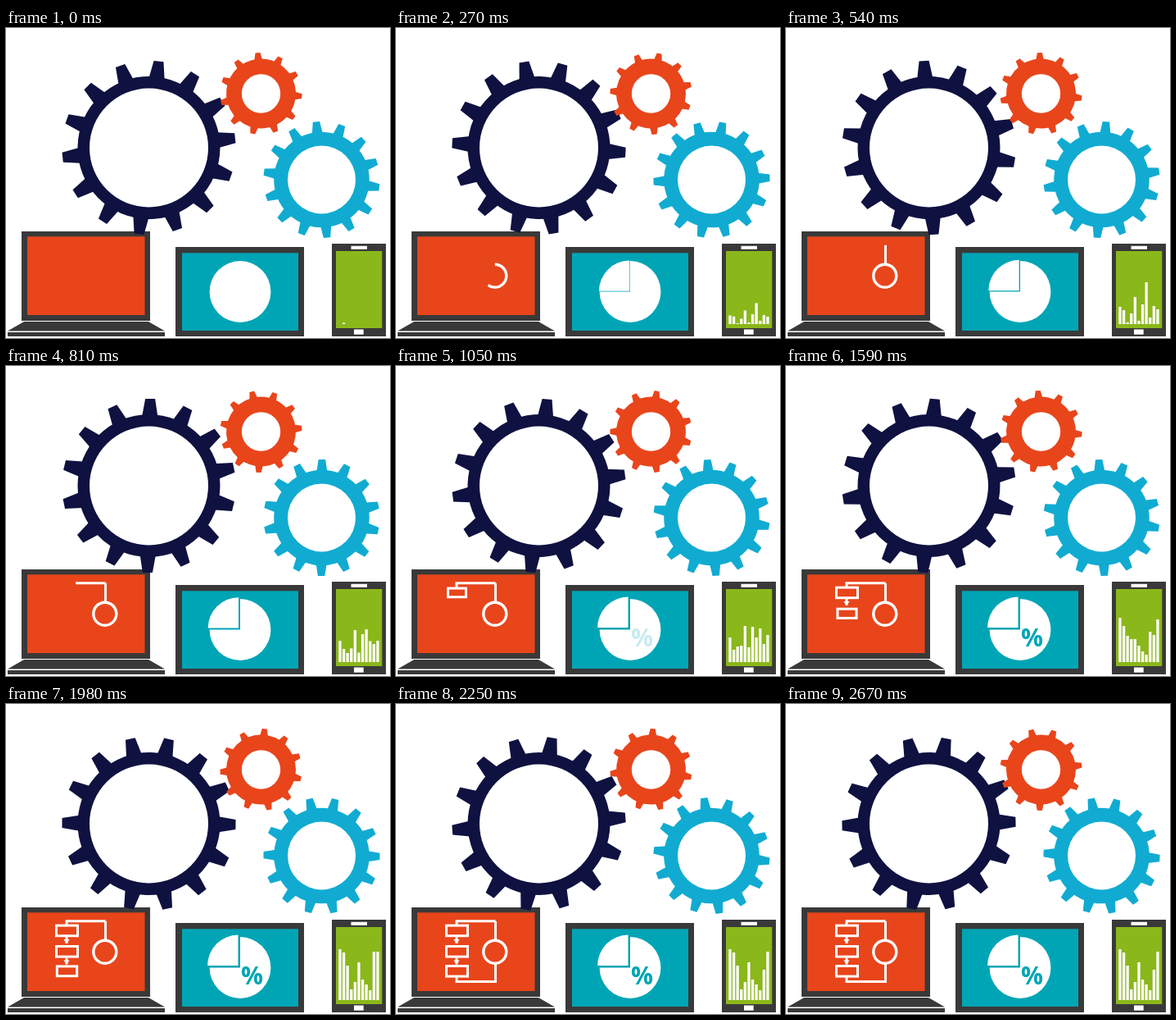
These frames come from a looping animation (469x378 px, 2700 ms). An HTML page with a canvas:

```html
<!DOCTYPE html>
<html lang="en">
<head>
<meta charset="utf-8">
<title>Gears and devices</title>
<style>
html, body { margin: 0; width: 100%; height: 100%; overflow: hidden; background: #fff; }
canvas { display: block; }
</style>
</head>
<body>
<canvas id="stage" width="469" height="378"></canvas>
<script>
const ctx = document.getElementById('stage').getContext('2d');
const LOOP = 2700, STEP = 30, TAU = Math.PI * 2;
const NAVY = '#0f1140', RED = '#e8451b', BLUE = '#11abd1', TEAL = '#00a5b5',
      GREEN = '#8ab71a', DARK = '#3a3939', WHITE = '#fff';

// Bar heights at a few times, linear in between
const BAR_TIMES = [0, 540, 1050, 1590, 1980, 2250];
const BARS = [
  [0, 1.5, 0, 0, 0, 0, 0, 0, 0, 0, 0],
  [21, 17, 2, 13, 33, 4, 24, 51, 8, 22, 18],
  [30, 15, 19, 20, 44, 18, 43, 30, 41, 22, 33],
  [54, 44, 32, 28, 28, 20, 13, 9, 37, 33, 52],
  [62, 58, 42, 13, 22, 46, 25, 19, 12, 59, 59],
  [62, 58, 42, 13, 22, 46, 25, 19, 12, 37, 59]
];

const progress = (t, from, to) => Math.min(1, Math.max(0, (t - from) / (to - from)));

function rect(color, x1, y1, x2, y2) {
  ctx.fillStyle = color;
  ctx.fillRect(x1, y1, x2 - x1, y2 - y1);
}

function disc(color, x, y, r) {
  ctx.fillStyle = color;
  ctx.beginPath();
  ctx.arc(x, y, r, 0, TAU);
  ctx.fill();
}

function poly(color, ...pts) {
  ctx.fillStyle = color;
  ctx.beginPath();
  for (let i = 0; i < pts.length; i += 2) ctx.lineTo(pts[i], pts[i + 1]);
  ctx.fill();
}

// Draws the first part (0..1) of a polyline
function trace(part, ...pts) {
  if (part <= 0) return;
  let total = 0;
  const len = i => Math.hypot(pts[i + 2] - pts[i], pts[i + 3] - pts[i + 1]);
  for (let i = 0; i < pts.length - 2; i += 2) total += len(i);
  let left = total * part;
  ctx.beginPath();
  ctx.moveTo(pts[0], pts[1]);
  for (let i = 0; i < pts.length - 2 && left > 0; i += 2) {
    const k = Math.min(1, left / len(i));
    ctx.lineTo(pts[i] + (pts[i + 2] - pts[i]) * k, pts[i + 1] + (pts[i + 3] - pts[i + 1]) * k);
    left -= len(i);
  }
  ctx.stroke();
}

function gear(g, turn) {
  ctx.save();
  ctx.translate(g.x, g.y);
  ctx.rotate((g.start + g.dir * turn) * Math.PI / 180);
  disc(g.color, 0, 0, g.body);
  for (let i = 0; i < g.teeth; i++) {
    ctx.rotate(TAU / g.teeth);
    poly(g.color, -g.base, 2 - g.body, -g.tip, -g.outer, g.tip, -g.outer, g.base, 2 - g.body);
  }
  ctx.restore();
  disc(WHITE, g.x, g.y, g.hole);
}

const GEARS = [
  { x: 174.5, y: 146, color: NAVY, teeth: 14, outer: 106, body: 87, hole: 72.5, tip: 6, base: 9.5, start: 6.5, dir: -1 },
  { x: 311.5, y: 80, color: RED, teeth: 11, outer: 50, body: 42.5, hole: 23.7, tip: 3, base: 5, start: -4.6, dir: 1 },
  { x: 385.5, y: 185, color: BLUE, teeth: 14, outer: 71, body: 58.3, hole: 41.5, tip: 4.2, base: 6.5, start: -5.3, dir: 1 }
];

function box(y, k) {
  if (k > 0) ctx.strokeRect(74.5 - 13 * k, y - 6.3 * k, 26 * k, 12.6 * k);
}

function arrow(y, k) {
  if (k <= 0) return;
  trace(k, 74, y, 74, y + 8);
  if (k > 0.6) poly(WHITE, 70.3, y + 3, 77.7, y + 3, 74, y + 8);
}

function laptop(t) {
  rect(DARK, 19, 248, 176, 357);
  rect(RED, 26, 254.3, 169.5, 350);
  poly(DARK, 22, 358, 174, 358, 194, 369.5, 2, 369.5);
  rect(DARK, 2, 371, 194, 376);

  ctx.strokeStyle = WHITE;
  ctx.lineWidth = 3;
  const ring = progress(t, 90, 390);
  if (ring > 0) {
    ctx.lineWidth = 3.4;
    ctx.beginPath();
    ctx.arc(120.8, 302.2, 14, -Math.PI / 2, -Math.PI / 2 + TAU * ring);
    ctx.stroke();
    ctx.lineWidth = 3;
  }
  trace(progress(t, 390, 540), 121.5, 288, 121.5, 264.8);
  trace(progress(t, 540, 930), 121.5, 264.8, 74, 264.8, 74, 270);
  box(276.4, progress(t, 390, 1170));
  if (t < 930) rect(RED, 58, 268, 91, 286);
  arrow(284, progress(t, 1200, 1380));
  if (t >= 1380) box(301.8, 0.5 + 0.5 * progress(t, 1380, 1650));
  arrow(309.5, progress(t, 1650, 1770));
  if (t >= 1770) box(325.8, 0.5 + 0.5 * progress(t, 1770, 2010));
  trace(progress(t, 2010, 2235), 74, 333, 74, 338.5, 121.5, 338.5, 121.5, 317);
}

function tablet(t) {
  rect(DARK, 207, 267, 364, 376);
  rect(TEAL, 215, 274.3, 357, 369);
  const x = 286, y = 321.5, r = 37.4, d = 2.5 * progress(t, 0, 1050);
  ctx.fillStyle = WHITE;
  if (d === 0) {
    disc(WHITE, x, y, r);
    return;
  }
  for (const [shift, from, to] of [[0, -Math.PI / 2, Math.PI], [d, Math.PI, Math.PI * 1.5]]) {
    ctx.beginPath();
    ctx.moveTo(x - shift, y - shift);
    ctx.arc(x - shift, y - shift, r, from, to);
    ctx.fill();
  }
  ctx.globalAlpha = progress(t, 960, 1380);
  ctx.fillStyle = TEAL;
  ctx.font = '700 30px "Open Sans", sans-serif';
  ctx.textAlign = 'center';
  ctx.fillText('%', 300.5, 342);
  ctx.globalAlpha = 1;
}

function phone(t) {
  rect(DARK, 398, 263, 464, 376);
  rect(GREEN, 403, 272, 459.3, 366);
  rect(WHITE, 421.5, 265.8, 441, 269.8);
  rect(WHITE, 425, 367.5, 436.7, 373.7);
  let i = 0;
  while (i < BAR_TIMES.length - 2 && t >= BAR_TIMES[i + 1]) i++;
  const k = progress(t, BAR_TIMES[i], BAR_TIMES[i + 1]);
  BARS[i].forEach((a, n) => {
    const x = 406.3 + n * 4.6, h = a + (BARS[i + 1][n] - a) * k;
    rect(WHITE, x, 361 - h, x + 3.3, 361);
  });
}

function draw(now) {
  const n = Math.floor((now % LOOP) / STEP), t = n * STEP;
  // The gears speed up through the loop
  const turn = 1.646 * n + 0.01905 * n ** 2 - 0.0000643 * n ** 3;
  rect(WHITE, 0, 0, 469, 378);
  laptop(t);
  tablet(t);
  phone(t);
  GEARS.forEach(g => gear(g, turn));
}

let begin;
function tick(now) {
  begin ??= now;
  draw(Math.max(0, now - begin));
  requestAnimationFrame(tick);
}
draw(0);
requestAnimationFrame(tick);
</script>
</body>
</html>
```
